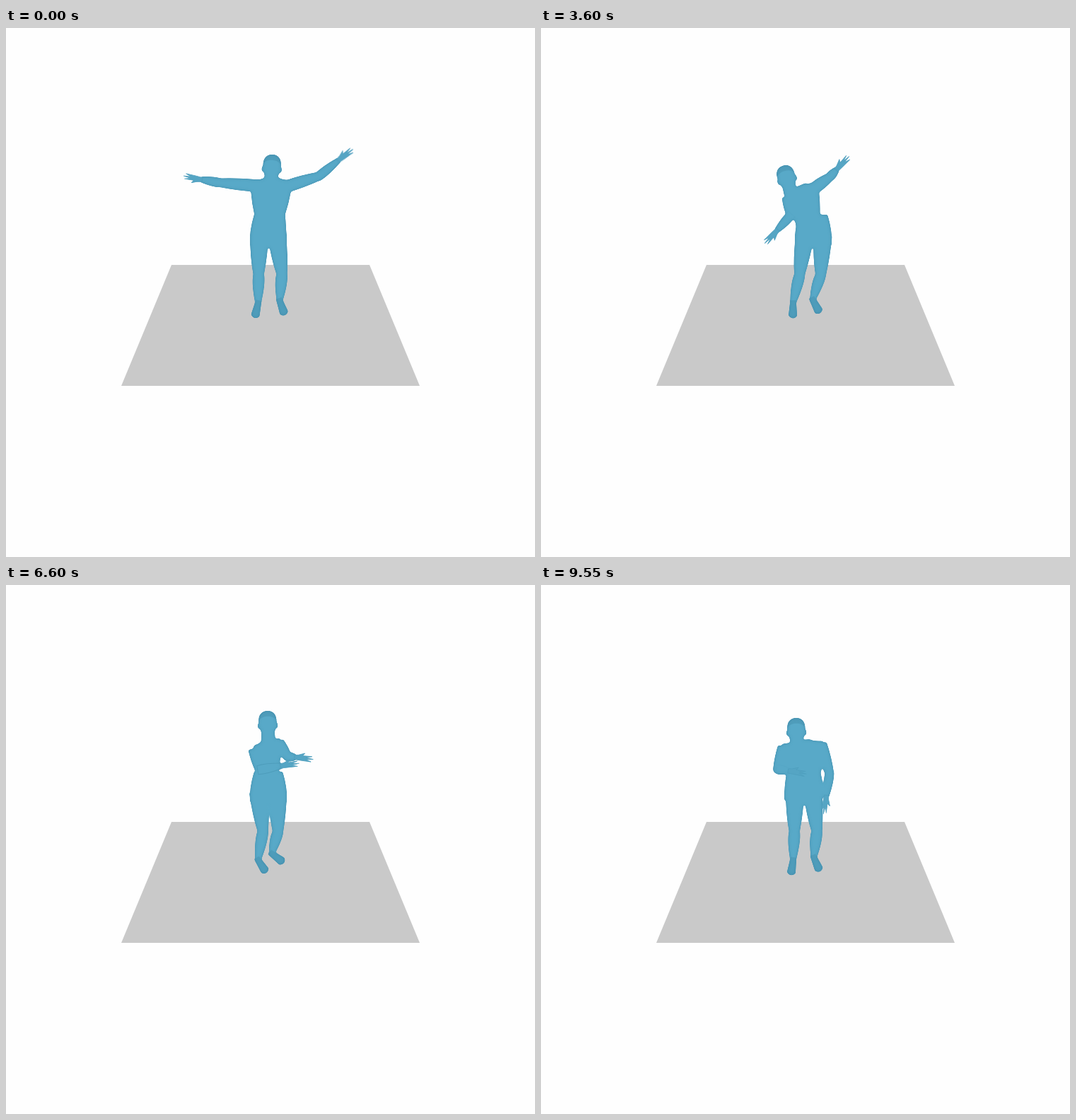
Recreate the animation shown at these times as an HTML page without scripts. Size 748 by 748 pixels, loop 9.6 s.

```html
<!DOCTYPE html>
<html lang="en">
<head>
<meta charset="utf-8">
<title>Moving figure</title>
<style>
/* Body: hip x, neck base, shoulder half-width and drop, turn to the right, head offset */
@property --hip { syntax: "<number>"; inherits: true; initial-value: 371; }
@property --nx { syntax: "<number>"; inherits: true; initial-value: 375; }
@property --ny { syntax: "<number>"; inherits: true; initial-value: 223; }
@property --wide { syntax: "<number>"; inherits: true; initial-value: 24; }
@property --drop { syntax: "<number>"; inherits: true; initial-value: 0; }
@property --turn { syntax: "<number>"; inherits: true; initial-value: 0; }
@property --hx { syntax: "<number>"; inherits: true; initial-value: 0; }
@property --hy { syntax: "<number>"; inherits: true; initial-value: 0; }
/* Arms: angle and visible length of the upper arm and the forearm */
@property --l-up { syntax: "<angle>"; inherits: true; initial-value: 0deg; }
@property --l-fore { syntax: "<angle>"; inherits: true; initial-value: 0deg; }
@property --l-len { syntax: "<number>"; inherits: true; initial-value: 40; }
@property --l-reach { syntax: "<number>"; inherits: true; initial-value: 30; }
@property --r-up { syntax: "<angle>"; inherits: true; initial-value: 0deg; }
@property --r-fore { syntax: "<angle>"; inherits: true; initial-value: 0deg; }
@property --r-len { syntax: "<number>"; inherits: true; initial-value: 40; }
@property --r-reach { syntax: "<number>"; inherits: true; initial-value: 30; }

html, body { margin: 0; width: 100%; height: 100%; overflow: hidden; background: #fefefe; }
svg { display: block; width: 100%; height: 100%; }
.figure { animation: dance 9.6s linear infinite; }
.skin { fill: #58a9c8; }
.shade { fill: #3f86a3; opacity: .35; }
.hand { fill: #55a5c4; stroke: #4f9fbe; stroke-linejoin: round; }
.crease { fill: none; stroke: #438ead; opacity: calc(var(--turn) * .5); }

.left {
  --side: -1;
  --up: var(--l-up); --fore: var(--l-fore); --len: var(--l-len); --reach: var(--l-reach);
  --ankle-x: 356.5; --ankle-y: 389;
  --bend: calc(6 * var(--turn));
  --toe: calc(103deg - 46deg * var(--turn));
}
.right {
  --side: 1;
  --up: var(--r-up); --fore: var(--r-fore); --len: var(--r-len); --reach: var(--r-reach);
  --ankle-x: calc(387 - 11 * var(--turn)); --ankle-y: calc(386 - 6 * var(--turn));
  --bend: 4.5;
  --toe: calc(70deg - 33deg * var(--turn));
}
.left, .right {
  --hip-x: calc(var(--hip) + 13 * var(--side));
  --knee: calc((var(--hip-x) + var(--ankle-x)) / 2 + var(--bend));
  --shoulder: translate(calc((var(--nx) + var(--side) * var(--wide)) * 1px), calc((var(--ny) - var(--side) * var(--drop)) * 1px));
  --elbow: var(--shoulder) rotate(var(--up)) translate(calc(var(--len) * 1px)) rotate(calc(var(--fore) - var(--up)));
}
.upper { transform: var(--shoulder) rotate(var(--up)) scale(calc(var(--len) / 40), 1); }
.elbow { transform: var(--elbow); }
.lower { transform: var(--elbow) scale(calc(var(--reach) / 40), 1); }
.hand { transform: var(--elbow) translate(calc(var(--reach) * 1px)) scale(.95, .75); }

/* Legs and chest shear between two moving joints */
.thigh { transform: matrix(1, 0, calc((var(--knee) - var(--hip-x)) / 46), 1, var(--hip-x), 302); }
.shin { transform: matrix(1, 0, calc((var(--ankle-x) - var(--knee)) / 42), calc((var(--ankle-y) - 348) / 42), var(--knee), 348); }
.foot { transform: translate(calc(var(--ankle-x) * 1px), calc(var(--ankle-y) * 1px)) rotate(var(--toe)); }
.pelvis { transform: translate(calc(var(--hip) * 1px), 302px); }
.chest {
  transform: matrix(calc(var(--wide) / 24), calc(var(--drop) / -24),
    calc((var(--hip) - var(--nx)) / 79), calc((302 - var(--ny)) / 79), var(--nx), var(--ny));
}
.head {
  transform: translate(calc((var(--nx) + var(--hx)) * 1px), calc((var(--ny) + var(--hy)) * 1px))
    rotate(calc((var(--nx) - var(--hip)) * 1deg));
}

@keyframes dance {
  0% {
    --hip: 371; --nx: 375; --ny: 223; --wide: 24; --drop: 0; --turn: 0; --hx: 1; --hy: -27;
    --l-up: 185deg; --l-len: 49; --l-fore: 190deg; --l-reach: 28;
    --r-up: -17deg; --r-len: 45; --r-fore: -39deg; --r-reach: 38;
  }
  10.4% { --l-up: 110deg; --l-len: 45; --l-fore: 108deg; --l-reach: 25; }
  21.354% {
    --hip: 372; --nx: 367; --ny: 229; --wide: 24; --drop: 6; --turn: .22; --hx: -10; --hy: -33;
    --l-up: 105deg; --l-len: 46; --l-fore: 86deg; --l-reach: 25;
    --r-up: -11deg; --r-len: 43; --r-fore: -23deg; --r-reach: 35;
  }
  27.1% {
    --l-up: 150deg; --l-len: 42; --l-fore: 165deg; --l-reach: 26;
    --r-up: -35deg; --r-len: 36; --r-fore: -62deg; --r-reach: 38;
  }
  37.5% {
    --hip: 385; --nx: 369; --ny: 233; --wide: 19; --drop: 8; --turn: .25; --hx: -22; --hy: -22;
    --l-up: 83deg; --l-len: 24; --l-fore: 132deg; --l-reach: 30;
    --r-up: -35deg; --r-len: 25; --r-fore: -48deg; --r-reach: 16;
  }
  46.9% { --r-up: -28deg; --r-len: 40; --r-fore: -42deg; --r-reach: 36; }
  52.6% { --r-up: 51deg; --r-len: 35; --r-fore: 3deg; --r-reach: 18; }
  56.771% {
    --hip: 375; --nx: 381; --ny: 230; --wide: 22; --drop: 2; --turn: .76; --hx: 2; --hy: -34;
    --l-up: 88deg; --l-len: 32; --l-fore: -53deg; --l-reach: 36;
    --r-up: 51deg; --r-len: 35; --r-fore: 3deg; --r-reach: 18;
  }
  68.75% {
    --hip: 371; --nx: 369; --ny: 229; --wide: 17; --drop: 5; --turn: 1; --hx: 1; --hy: -34;
    --l-up: 77deg; --l-len: 28; --l-fore: -10deg; --l-reach: 33;
    --r-up: 58deg; --r-len: 22; --r-fore: 5deg; --r-reach: 13;
  }
  77.1%, 88.5% { --r-up: -20deg; --r-len: 40; --r-fore: -38deg; --r-reach: 38; }
  81.25% {
    --hip: 367; --nx: 373; --ny: 235; --wide: 21; --drop: 6; --turn: .65; --hx: 13; --hy: -17;
    --l-up: 137deg; --l-len: 35; --l-fore: 72deg; --l-reach: 27;
    --r-up: -8deg; --r-len: 36; --r-fore: -8deg; --r-reach: 30;
  }
  88.4% { --l-up: 130deg; --l-len: 40; --l-fore: 125deg; --l-reach: 26; }
  94% { --r-up: 74deg; --r-len: 40; --r-fore: 98deg; --r-reach: 34; }
  99.479%, 100% {
    --hip: 372; --nx: 370; --ny: 230; --wide: 27; --drop: 2; --turn: .1; --hx: -9; --hy: -25;
    --l-up: 107deg; --l-len: 30; --l-fore: 8deg; --l-reach: 18;
    --r-up: 74deg; --r-len: 40; --r-fore: 98deg; --r-reach: 34;
  }
}
</style>
</head>
<body>
<svg viewBox="0 0 748 748">
  <defs>
    <!-- Rounds the joined limbs, then darkens the rim -->
    <filter id="body" filterUnits="userSpaceOnUse" x="230" y="120" width="290" height="310" color-interpolation-filters="sRGB">
      <feGaussianBlur stdDeviation="1.7"/>
      <feComponentTransfer result="shape"><feFuncA type="linear" slope="6" intercept="-2.2"/></feComponentTransfer>
      <feGaussianBlur in="shape" stdDeviation="2" result="core"/>
      <feFlood flood-color="#37809f" flood-opacity=".7"/>
      <feComposite operator="out" in2="core"/>
      <feComposite operator="in" in2="shape" result="rim"/>
      <feMerge><feMergeNode in="shape"/><feMergeNode in="rim"/></feMerge>
    </filter>
    <path id="upper" d="M-4-8Q20-9 40-6V6Q20 9-4 9Z"/>
    <path id="lower" d="M-3-6Q12-8 40-3.5V3.5Q12 8-3 6Z"/>
    <path id="palm" d="M-3-4 3-5 12-9 9-4 23-4 14-1 25 1 14 2 22 6 8 5-3 4Z"/>
    <path id="thigh" d="M-13-8H13Q12 20 7.5 46H-7.5Q-12 25-13-8Z"/>
    <path id="shin" d="M-7.5 0Q-10 14-4 42H4Q10 14 7.5 0Z"/>
    <path id="foot" d="M-4-4Q8-5 18-6 25 0 18 6 8 5-4 4Z"/>
  </defs>

  <path fill="#c9c9c9" d="M234 335H514L585 506H163Z"/>

  <g class="figure">
    <g class="skin" filter="url(#body)">
      <g class="right">
        <use class="thigh" href="#thigh"/>
        <use class="shin" href="#shin"/>
        <use class="foot" href="#foot"/>
        <use class="upper" href="#upper"/>
        <circle class="elbow" r="6"/>
        <use class="lower" href="#lower"/>
      </g>
      <g class="left">
        <use class="thigh" href="#thigh"/>
        <use class="shin" href="#shin"/>
        <use class="foot" href="#foot"/>
        <use class="upper" href="#upper"/>
        <circle class="elbow" r="6"/>
        <use class="lower" href="#lower"/>
      </g>
      <path class="pelvis" d="M-20-38Q-27-15-26 4L0 9 26 4Q27-15 20-38Z"/>
      <path class="chest" d="M-9-12Q-14-8-25-8-30-2-28 9-26 25-21.5 41-24 55-25 79H25Q24 55 21.5 41 26 25 28 9 30-2 25-8 14-8 9-12Z"/>
      <g class="head">
        <path d="M0-17C9-17 13-10 12.5-2 12 8 9 18 0 21-9 18-12 8-12.5-2-13-10-9-17 0-17Z"/>
        <path d="M-9 10-10 26H10L9 10Z"/>
        <ellipse cx="-12.5" cy="4" rx="1.5" ry="4"/>
        <ellipse cx="12.5" cy="4" rx="1.5" ry="4"/>
      </g>
    </g>

    <path class="head shade" d="M-12-4C-12-13-7-17 0-17S12-13 12-4C8-11-8-11-12-4Z"/>
    <g class="right">
      <use class="foot shade" href="#foot"/>
      <use class="hand" href="#palm"/>
    </g>
    <g class="left">
      <use class="foot shade" href="#foot"/>
      <use class="lower crease" href="#lower"/>
      <use class="hand" href="#palm"/>
    </g>
  </g>
</svg>
</body>
</html>
```
